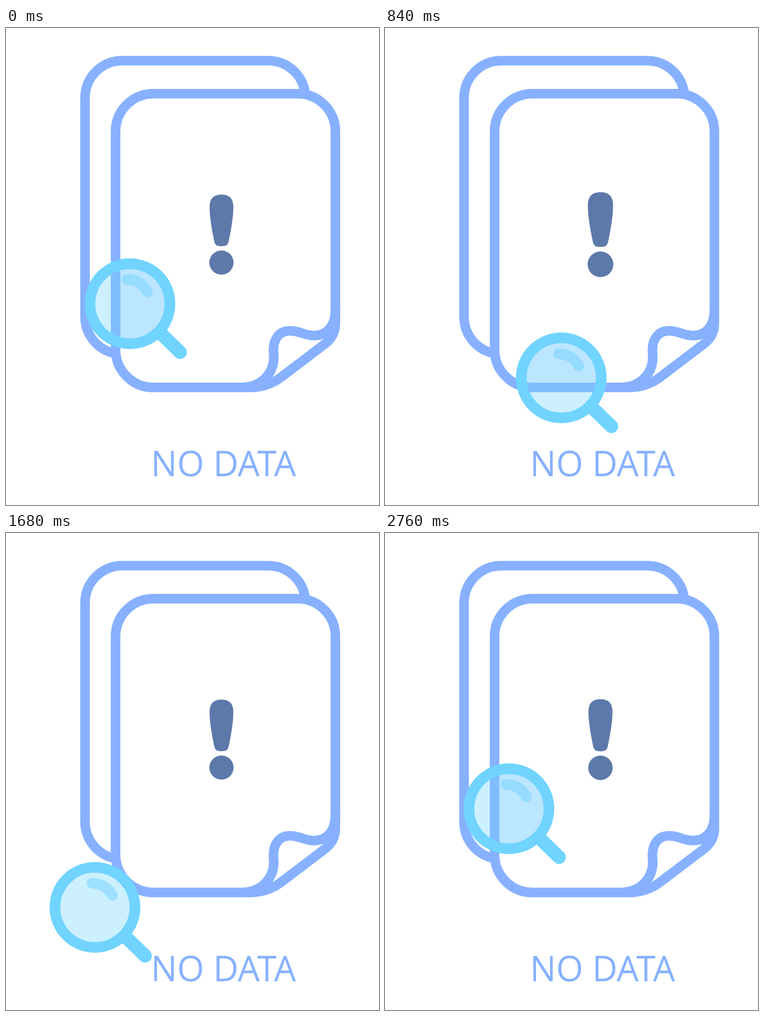
An HTML page that plays this animation: 662x846 px, repeating every 2.8 s.

```html
<!DOCTYPE html>
<html lang="en">
<head>
<meta charset="utf-8">
<title>No data</title>
<style>
  html, body { margin: 0; width: 100%; height: 100%; overflow: hidden; background: #fff; }
  svg { display: block; width: 662px; height: 846px; }
  .line { fill: none; stroke: #87b1ff; stroke-width: 17; stroke-linejoin: round; }
  text { font: 61.6px "Open Sans", "Noto Sans", sans-serif; fill: #87b1ff; text-anchor: middle; }
</style>
</head>
<body>
<svg viewBox="0 0 662 846">
  <defs>
    <path id="sheet" d="M417 637.5H261.5A67 67 0 0 1 194.5 570.5V183.5A67 67 0 0 1 261.5 116.5H517.5A67 67 0 0 1 584.6 183.5V500C584.6 528 570 545.5 547 545.5C528 545.5 523 537 504 537C485 537 472.500 552 475 578C478 610 455 637.5 417 637.5Z"/>
    <clipPath id="inside"><use href="#sheet"/></clipPath>
  </defs>

  <path class="line" d="M531 116A66 66 0 0 0 465 58H206.500A66 66 0 0 0 140.300 124V513A66 66 0 0 0 196 577.500"/>
  <use href="#sheet" fill="#fff"/>
  <g clip-path="url(#inside)"><circle id="tint" r="66" fill="#e5eeff"/></g>
  <use href="#sheet" class="line"/>
  <path class="line" d="M415 637.400H435C456 637 474 630 488 619.500L567 559.500C579 550 584.600 537 584.600 524V495"/>

  <g id="mark" fill="#5d79aa">
    <path d="M382.400 295.500C396 295.500 403.500 302 403.500 318C403.500 336 399 360 395.500 377C394 384 392 387 382.400 387C372.800 387 370.800 384 369.300 377C365.800 360 361.300 336 361.300 318C361.300 302 368.800 295.500 382.400 295.500Z"/>
    <circle cx="382.400" cy="416" r="21.500"/>
  </g>

  <text x="386" y="794.500">NO DATA</text>

  <g id="lens" fill="none" stroke="#70d4ff" stroke-linecap="round">
    <circle r="66" fill="#70d4ff" fill-opacity=".35" stroke="none"/>
    <path d="M-5-43Q20-42 31-21" stroke-width="19" stroke-opacity=".5"/>
    <path d="M53 51L89 86" stroke-width="24"/>
    <circle r="71" stroke-width="19"/>
  </g>
</svg>
<script>
  const STEP = 40, STEPS = 70;
  const pulseStarts = [0, 12, 28, 42, 56, 70];
  const [tint, lens, mark] = ["tint", "lens", "mark"].map(id => document.getElementById(id));
  const start = performance.now();

  // Triangle wave from 0 to 1 and back within each beat
  function pulse(step) {
    const i = pulseStarts.findIndex(s => s > step);
    const from = pulseStarts[i - 1], length = pulseStarts[i] - from;
    return 1 - Math.abs(2 * (step - from) / length - 1);
  }

  function draw(now) {
    const step = Math.floor(Math.max(0, now - start) / STEP) % STEPS;
    const angle = 2 * Math.PI * step / (STEPS - 1);
    const x = 220 + 98.5 * Math.sin(angle);
    const y = 587.5 - 98.5 * Math.cos(angle);
    for (const part of [tint, lens]) part.setAttribute("transform", `translate(${x} ${y})`);

    const scale = 1 + 0.07 * pulse(step);
    mark.setAttribute("transform",
      `translate(382.4 366.7) scale(${scale}) translate(-382.4 -366.7)`);
    requestAnimationFrame(draw);
  }
  draw(start);
</script>
</body>
</html>
```
